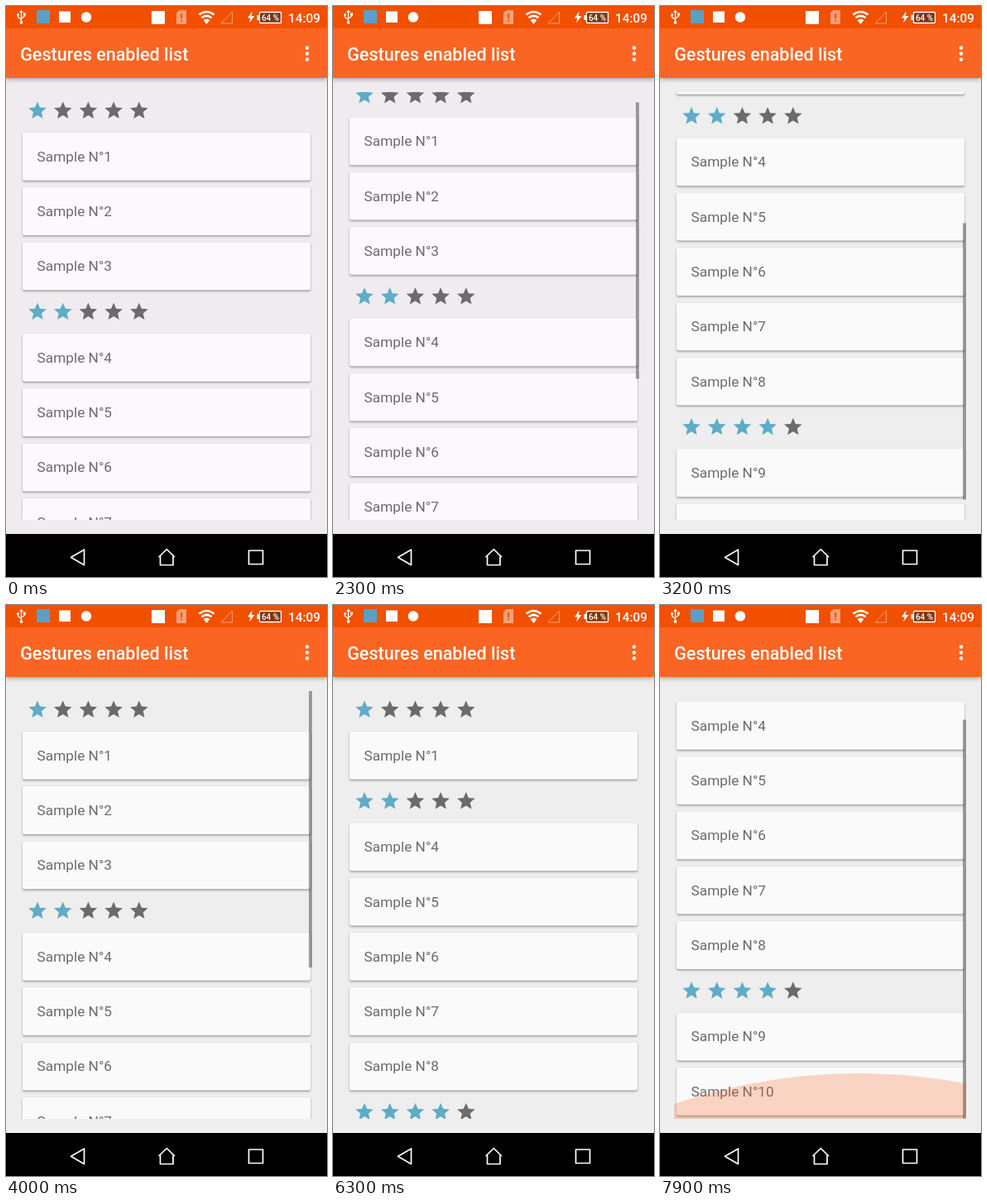
These frames come from a looping animation (388x690 px, 8000 ms). An HTML page:

```html
<!DOCTYPE html>
<html lang="en">
<head>
<meta charset="utf-8">
<title>Gestures enabled list</title>
<style>
  html, body { margin: 0; width: 100%; height: 100%; overflow: hidden; background: #eee; }
  #stage { position: relative; width: 388px; height: 690px; overflow: hidden;
    background: var(--page); font-family: Roboto, sans-serif;
    --page: #eee; --card: #fafafa; --ink: #6b6b6b; }
  #stage.warm { --page: #efebef; --card: #fdf8fd; --ink: #6e696e; }
  #chrome { position: absolute; left: 0; top: 0; }
  #appbar { position: absolute; top: 0; width: 388px; height: 87px; background: #fb6523;
    box-shadow: 0 2px 5px rgba(0, 0, 0, .3); }
  #list { position: absolute; left: 17px; top: 104px; width: 353px; height: 517px; overflow: hidden; }
  .row { position: absolute; left: 0; top: 0; width: 353px; }
  .card { position: absolute; left: 3.3px; top: .2px; width: 347.4px; height: 57.8px;
    border-radius: 2px; background: var(--card); color: var(--ink);
    box-shadow: 0 1.5px 2.5px rgba(0, 0, 0, .34), 0 0 1px rgba(0, 0, 0, .14);
    font-size: 17.24px; line-height: 59px; text-indent: 17.3px; white-space: nowrap; }
  .stars { position: absolute; left: 0; top: 0; fill: var(--ink); }
  .stars .on { fill: #5eacc7; }
  #thumb { position: absolute; left: 349.2px; top: 0; width: 4px; background: rgba(0, 0, 0, .36); }
  #glow { position: absolute; left: -467px; top: 0; width: 1380px; height: 1380px;
    border-radius: 50%; background: rgba(243, 98, 30, .25); }
</style>
</head>
<body>
<div id="stage">
  <div id="list"></div>
  <div id="appbar"></div>
  <svg id="chrome" width="388" height="690" fill="#fff">
    <rect width="388" height="27" fill="#f05000"/>
    <g fill="none" stroke="#fff" stroke-width="1.3">
      <path d="M18.500 7V20M14.500 11V13.500L18.500 16.500M22.500 10V12.500L18.500 15"/>
    </g>
    <path d="M18.500 4.500L21 8H16Z"/>
    <circle cx="18.500" cy="20" r="1.900"/><circle cx="14.500" cy="10.500" r="1.500"/>
    <rect x="21" y="8.500" width="3" height="3"/>
    <rect x="37" y="5" width="16" height="16" fill="#5b9fc4"/>
    <rect x="64" y="6.500" width="14" height="13.500"/>
    <circle cx="97" cy="13.500" r="6.200"/>
    <rect x="176" y="6" width="16" height="16"/>
    <g fill="#f7a078">
      <path d="M209.500 5H218V22H206V8.500Z"/>
      <path d="M211.200 9H213.200V15H211.200ZM211.200 16.500H213.200V18.500H211.200Z" fill="#f05000"/>
    </g>
    <g fill="none" stroke="#fff" stroke-width="2.600">
      <path d="M233.500 10.500Q242.500 3.500 251.500 10.500M236.500 14.300Q242.500 9.300 248.500 14.300"/>
    </g>
    <path d="M238.600 17Q242.500 13.800 246.400 17L242.500 22Z"/>
    <path d="M260 21L273.500 7V21Z" fill="none" stroke="#f7a078"/>
    <path d="M297.500 6.500L292 14.500H295.500L294 20.500L300.500 12H296.800Z"/>
    <rect x="306.500" y="7.500" width="26" height="13" rx="1" fill="#7b3510" stroke="#fff" stroke-width="1.300"/>
    <rect x="303.500" y="11" width="2.500" height="6"/>
    <g font-family="Roboto, sans-serif" font-weight="500">
      <text x="319.500" y="17.500" font-size="10" text-anchor="middle">64 %</text>
      <text x="341" y="19.500" font-size="15.300">14:09</text>
      <text x="17.200" y="66" font-size="21.560">Gestures enabled list</text>
    </g>
    <circle cx="364" cy="50.500" r="2.200"/><circle cx="364" cy="57.500" r="2.200"/><circle cx="364" cy="64.500" r="2.200"/>
    <rect y="638" width="388" height="52" fill="#000"/>
    <g fill="none" stroke="#fff" stroke-width="1.700" stroke-linejoin="round">
      <path d="M94.500 657V675.500L78.500 666.300Z"/>
      <path d="M184.500 666L194.300 656.500L204 666M186.500 664.500V675.500H202V664.500"/>
      <rect x="293.500" y="658" width="17" height="16.500"/>
    </g>
  </svg>
</div>
<script>
const LOOP = 8000, STEP = 100, VIEW = 517, PAD = 4.5;
const CARD_H = 66.3, HEAD_H = 44.2;
const STAR = 'M12 17.27L18.18 21l-1.64-7.03L22 9.24l-7.19-.61L12 2 9.19 8.63 2 9.24l5.46 4.73L5.82 21z';

// [time, value] steps
const SCROLL = [[2200, 0], [2300, 18.5], [2500, 112], [2700, 186], [2900, 225], [3100, 236.5],
  [3200, 236.5], [3300, 226], [3500, 146], [3700, 50], [3900, 4], [4000, 0],
  [7400, 0], [7500, 9], [7700, 36]];
const BAR = [[2200, 0], [2300, 1], [4300, 1], [4550, 0], [7400, 0], [7500, 1]];
const GLOW = [[7600, 0], [7700, 16], [7800, 40], [7900, 55]];

// start of each swipe and of the gap closing behind it
const SWIPES = { 1: [6450, 6900], 2: [4450, 4920], 3: [5350, 5820] };

const stage = document.getElementById('stage');
const list = document.getElementById('list');

const clamp = v => Math.max(0, Math.min(1, v));
const ease = v => { v = clamp(v); return v * v * (3 - 2 * v); };
function track(steps, t) {
  const i = steps.findIndex(s => s[0] > t);
  if (i === 0) return steps[0][1];
  if (i < 0) return steps[steps.length - 1][1];
  const [t0, a] = steps[i - 1], [t1, b] = steps[i];
  return a + (b - a) * (t - t0) / (t1 - t0);
}
function addBox(attrs, html = '') {
  const el = document.createElement('div');
  Object.assign(el, attrs);
  el.innerHTML = html;
  return list.appendChild(el);
}

const rows = [];
function addHeader(count, gone) {
  const stars = [0, 1, 2, 3, 4].map(i =>
    `<path class="${i < count ? 'on' : ''}" d="${STAR}" transform="translate(${8.1 + i * 30.7} 4.8) scale(1.078)"/>`);
  const el = addBox({ className: 'row' }, `<svg class="stars" width="180" height="44">${stars.join('')}</svg>`);
  rows.push({ el, height: HEAD_H, gone, header: true });
}
function addCard(n) {
  const el = addBox({ className: 'row' }, `<div class="card">Sample N°${n}</div>`);
  const [swipe, gone] = SWIPES[n] || [];
  rows.push({ el, height: CARD_H, swipe, gone });
}
[[1, 1, 3], [2, 4, 8], [4, 9, 10]].forEach(([stars, first, last]) => {
  addHeader(stars, first === 1 ? SWIPES[1][1] : undefined);
  for (let n = first; n <= last; n++) addCard(n);
});
const thumb = addBox({ id: 'thumb' });
const glow = addBox({ id: 'glow' });

function render(t) {
  stage.classList.toggle('warm', t < 2400);
  const scroll = track(SCROLL, t);
  let y = PAD - scroll;
  for (const row of rows) {
    const { el, height, swipe, gone, header } = row;
    const x = swipe ? 360 * ease((t - swipe) / 430) : 0;
    el.style.transform = `translate(${x}px, ${y}px)`;
    el.style.opacity = header && gone ? 1 - clamp((t - gone) / 120) : 1;
    y += height * (gone ? 1 - ease((t - gone - 80) / 250) : 1);
  }
  const short = t > 7000;
  thumb.style.height = (short ? 482 : 334) + 'px';
  thumb.style.transform = `translateY(${scroll * (short ? 0.96 : 0.67)}px)`;
  thumb.style.opacity = track(BAR, t);
  glow.style.transform = `translateY(${VIEW - track(GLOW, t)}px)`;
}

const start = performance.now();
function tick() {
  const t = (performance.now() - start) % LOOP;
  render(Math.floor(t / STEP) * STEP);
  requestAnimationFrame(tick);
}
render(0);
requestAnimationFrame(tick);
</script>
</body>
</html>
```
